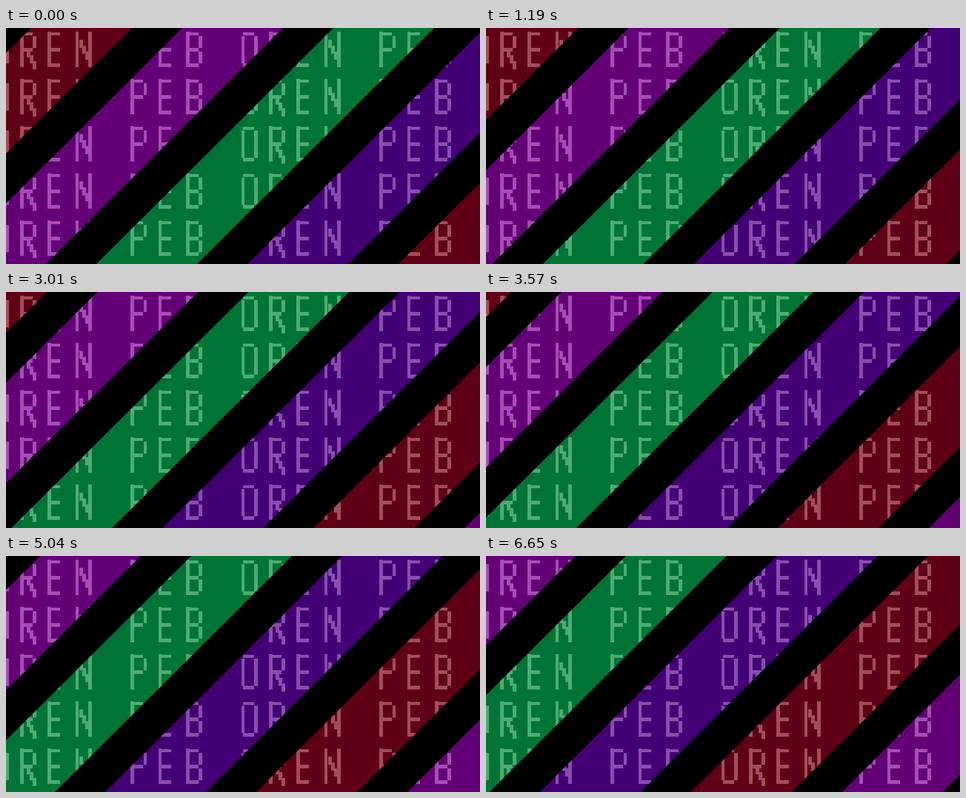
An HTML page for the animation above (6720 ms loop, 640 by 320 pixels).

```html
<!DOCTYPE html>
<html lang="en">
<head>
<meta charset="utf-8">
<title>Striped lettering</title>
<style>
  html, body { margin: 0; width: 100%; height: 100%; overflow: hidden; background: #000; }
  svg { display: block; width: 640px; height: 320px; }
</style>
</head>
<body>
<svg viewBox="0 0 640 320" role="img" aria-label="OREN PEB">
  <mask id="lettering" maskUnits="userSpaceOnUse" x="0" y="0" width="640" height="320">
    <path id="letters" transform="scale(2.66667)" fill="none" stroke="#fff" stroke-width="1.8" shape-rendering="crispEdges"/>
  </mask>
  <g id="dark"></g>
  <g mask="url(#lettering)"><g id="light"></g></g>
</svg>
<script>
(() => {
  const LOOP = 6720, STEP = 70, SHIFT = 8 / 3;
  const PITCH = 204, WIDTH = 136, FIRST = 34, COUNT = 6;
  const DARK = ['#600014', '#640076', '#007434', '#420074'];
  const LIGHT = ['#a44c5c', '#a64cb6', '#4cac74', '#8a4cb0'];
  const CELL_W = 14, CELL_H = 24;
  const byId = id => document.getElementById(id);

  // Letters are combinations of shared strokes, relative to the cell's corner.
  const stairs = (x, y) => [0, 1, 2].map(i => `m${x + i * 1.5} ${y + i * 3}v4m${-x - i * 1.5} ${-y - i * 3 - 4}`).join('');
  const bar = y => `m1 ${y}h5.5m-6.5 ${-y}`;
  const post = (x, y, length) => `m${x} ${y}v${length}m${-x} ${-y - length}`;
  const left = post(1, 0, 18), right = post(7.5, 0, 18);
  const roof = bar(1), waist = bar(9), floor = bar(17);
  const bowl = left + roof + waist + post(7.5, 2, 6);
  const GLYPHS = {
    O: post(1, 2, 14) + post(7.5, 2, 14) + roof + floor,
    R: bowl + stairs(4.5, 9),
    E: left + roof + waist + floor,
    N: left + right + stairs(3, 4),
    P: bowl,
    B: bowl + post(7.5, 10, 6) + floor,
    ' ': ''
  };

  function letterPath(text) {
    let d = '';
    for (let row = 0; row < 5; row++)
      for (let col = 0; col < 18; col++)
        d += `M${col * CELL_W - 7} ${row * CELL_H + 2}` + GLYPHS[text[col % text.length]];
    return d;
  }

  function stripes(colors) {
    return Array.from({ length: COUNT }, (_, i) =>
      `<path fill="${colors[i % 4]}" d="M${FIRST + i * PITCH} 0h${WIDTH}l-320 320h-${WIDTH}z"/>`
    ).join('');
  }

  function draw(time) {
    const x = -Math.floor((time % LOOP) / STEP) * SHIFT;
    for (const id of ['dark', 'light'])
      byId(id).setAttribute('transform', `translate(${x} 0)`);
  }

  byId('letters').setAttribute('d', letterPath('OREN PEB '));
  byId('dark').innerHTML = stripes(DARK);
  byId('light').innerHTML = stripes(LIGHT);

  const start = performance.now();
  function tick() {
    draw(Math.max(0, performance.now() - start));
    requestAnimationFrame(tick);
  }
  tick();
})();
</script>
</body>
</html>
```
